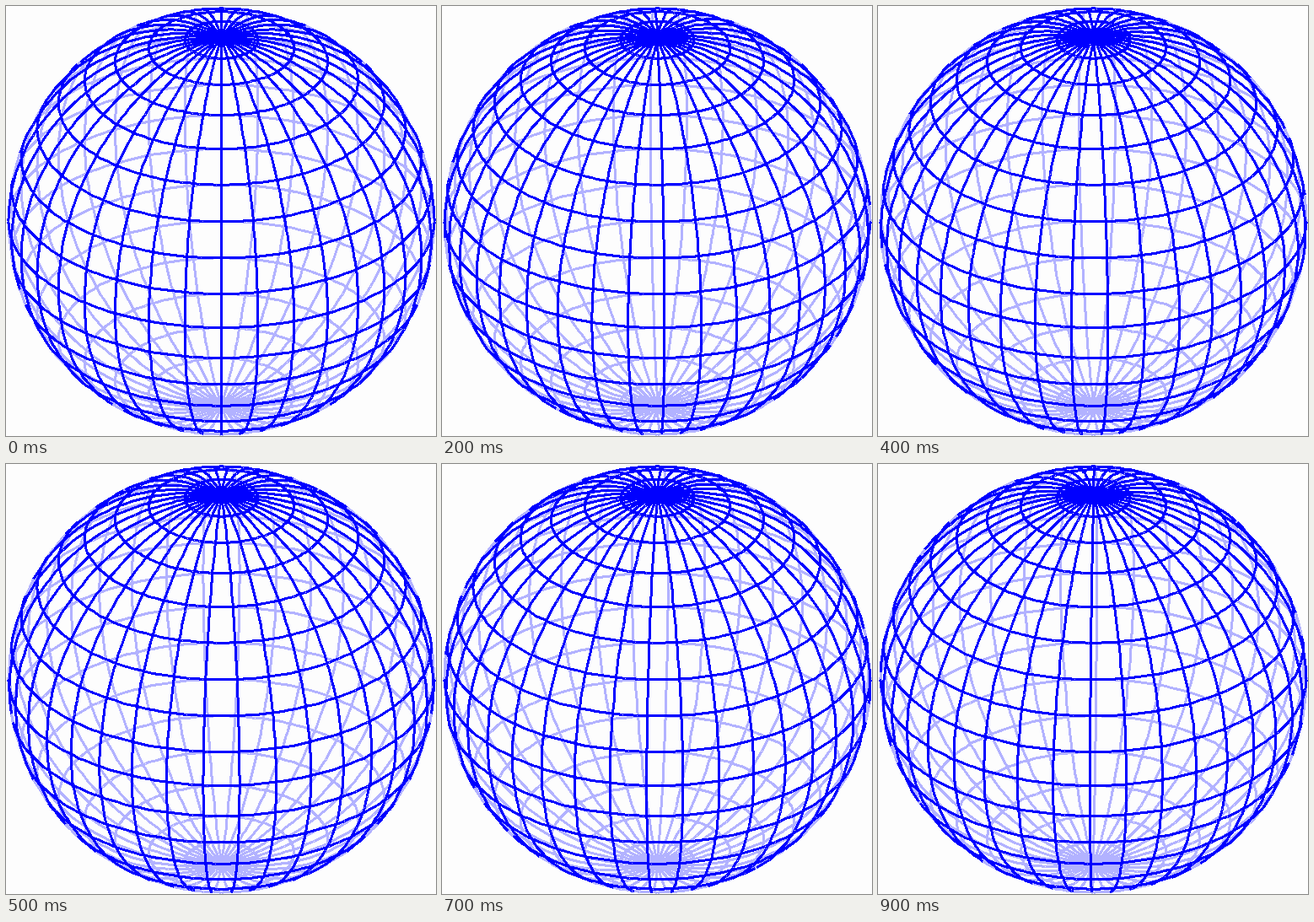
Animation, 510 px wide and 510 px high, one loop 1000 ms. Source, as an HTML page:

```html
<!DOCTYPE html>
<html lang="en">
<head>
<meta charset="utf-8">
<title>Turning wireframe sphere</title>
<style>
  html, body { margin: 0; width: 100%; height: 100%; overflow: hidden; background: #fdfdfd; }
  svg { display: block; width: 100%; height: 100%; }
  path { fill: none; stroke-width: 3; stroke-linejoin: round; shape-rendering: crispEdges; }
  #back { stroke: #b2b2ff; }
  #front { stroke: #0000ff; }
</style>
</head>
<body>
<svg viewBox="0 0 510 510">
  <path id="back"/>
  <path id="front"/>
</svg>
<script>
  const CENTER = 255.5, RADIUS = 253, GRID = 10, SAMPLE = 2;
  const STEP_MS = 100, STEPS = 10;
  const rad = deg => deg * Math.PI / 180;
  const TILT = rad(30);
  const back = document.getElementById('back');
  const front = document.getElementById('front');

  // Whole pixels from the center, cut toward it; toFixed absorbs float error.
  const snap = v => CENTER + Math.trunc((RADIUS * v).toFixed(6));

  // Orthographic view; depth is positive on the near side.
  function project(lat, lon) {
    const a = rad(lat), b = rad(lon);
    const x = Math.cos(a) * Math.sin(b);
    const y = Math.sin(a);
    const z = Math.cos(a) * Math.cos(b);
    return {
      x: snap(x),
      y: snap(z * Math.sin(TILT) - y * Math.cos(TILT)),
      depth: y * Math.sin(TILT) + z * Math.cos(TILT)
    };
  }

  const xy = p => p.x + ' ' + p.y;

  // Splits a curve into its near and far runs.
  function trace(pointAt, from, to, out) {
    let prev = pointAt(from), side = null;
    for (let v = from + SAMPLE; v <= to; v += SAMPLE) {
      const next = pointAt(v);
      const near = prev.depth + next.depth > 0 ? 'front' : 'back';
      out[near] += (near === side ? 'L' : 'M' + xy(prev) + 'L') + xy(next);
      side = near;
      prev = next;
    }
  }

  function draw(turn) {
    const out = { front: '', back: '' };
    for (let lat = -80; lat <= 80; lat += GRID)
      trace(lon => project(lat, lon), 0, 360, out);
    for (let lon = 0; lon < 360; lon += GRID)
      trace(lat => project(lat, lon + turn), -90, 90, out);
    back.setAttribute('d', out.back);
    front.setAttribute('d', out.front);
  }

  let shown = -1;
  function tick() {
    const step = Math.floor(performance.now() / STEP_MS) % STEPS;
    if (step !== shown) {
      shown = step;
      draw(step * GRID / STEPS);
    }
    requestAnimationFrame(tick);
  }
  tick();
</script>
</body>
</html>
```
